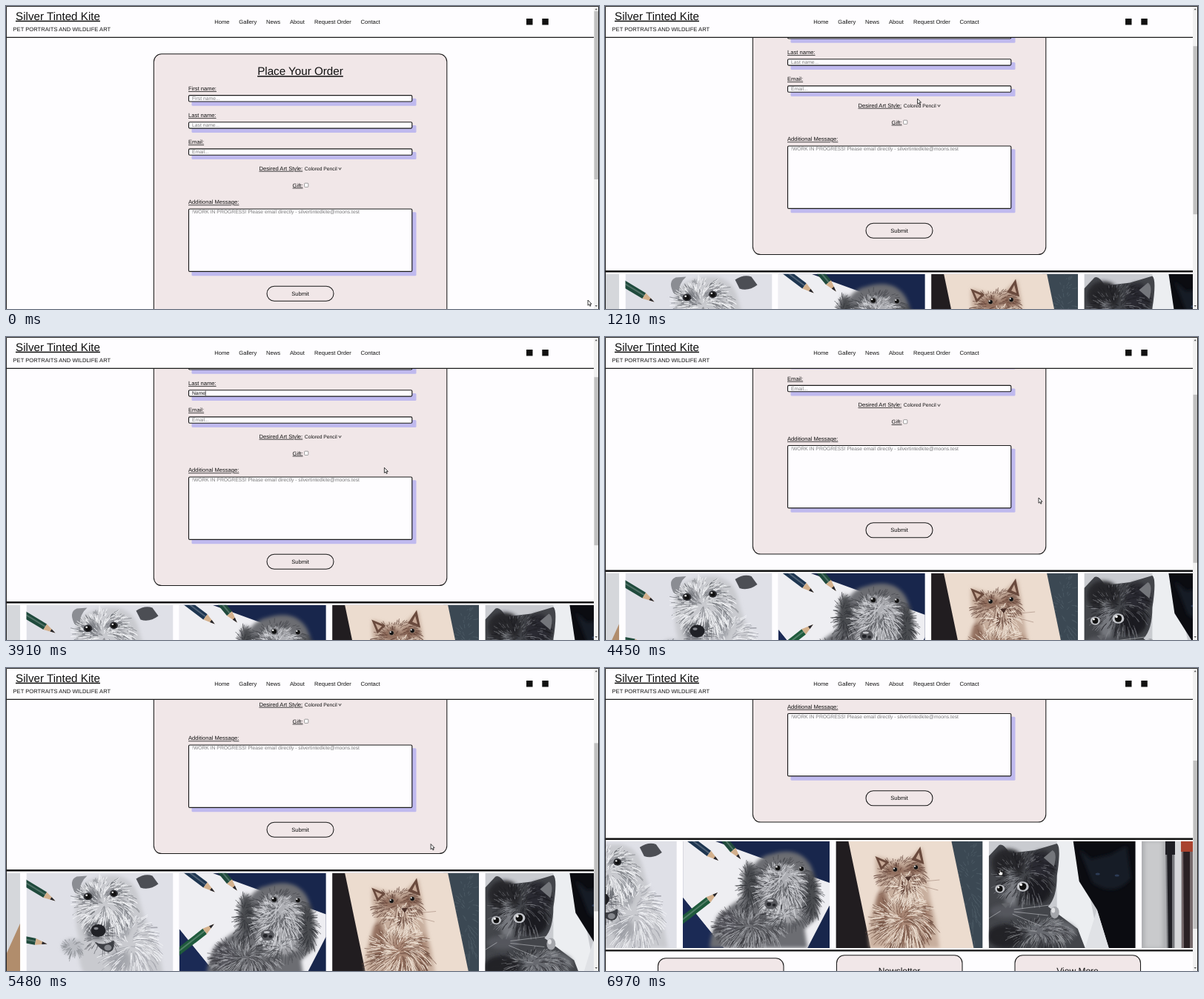
An HTML page that plays this animation: 800x409 px, repeating every 7.03 s.

```html
<!DOCTYPE html>
<html lang="en">
<head>
<meta charset="utf-8">
<title>Order form</title>
<style>
  html, body { margin: 0; width: 100%; height: 100%; overflow: hidden; background: #fefdff; }
  svg { display: block; }
  text { font: 7.6px "Liberation Sans", Arial, sans-serif; text-rendering: geometricPrecision; fill: #111; white-space: pre; }
  .u { text-decoration: underline; }
  .big { font-size: 15.2px; }
  .mid { font-size: 12px; }
  .small { font-size: 6.75px; }
  .hint { fill: #7a7a7a; }
  .c { text-anchor: middle; }
  .card { fill: #f1e7e8; stroke: #1a1a1a; stroke-width: 1.05; }
  .field { fill: #fefdff; stroke: #1a1a1a; stroke-width: 1.15; }
  .shade { fill: #bfb9ee; }
</style>
</head>
<body>
<svg id="stage" width="800" height="409" viewBox="0 0 800 409">
  <filter id="soft" x="-20%" y="-20%" width="140%" height="140%"><feGaussianBlur stdDeviation="2.5"/></filter>
  <rect width="800" height="409" fill="#fefdff"/>
  <g id="page">
    <rect class="card" x="199.4" y="64.8" width="395.4" height="355.8" rx="10.5"/>
    <text class="big u c" x="397" y="93.2">Place Your Order</text>
    <g id="fields"></g>
    <text class="u" x="341.5" y="221.8">Desired Art Style:</text>
    <text class="small" x="402.8" y="221.8">Colored Pencil</text>
    <path d="M448.8 218l1.7 3.2 1.7-3.2" fill="none" stroke="#222" stroke-width=".8"/>
    <text class="u" x="386.6" y="244.6">Gift:</text>
    <rect x="402.6" y="239.2" width="5.2" height="5.2" rx=".8" fill="#fff" stroke="#777" stroke-width=".7"/>
    <rect class="card" x="352" y="378.2" width="90" height="20" rx="10"/>
    <text class="c" x="397" y="390.8">Submit</text>
    <path d="M0 443.3H793M0 593.9H793" stroke="#111" stroke-width="2.4"/>
    <svg x="1" y="446.5" width="792" height="144"><g id="reel"></g></svg>
    <rect class="card" x="71.5" y="604.3" width="169.5" height="150" rx="10.5"/>
    <rect class="card" x="312.5" y="600.3" width="169.5" height="150" rx="10.5"/>
    <rect class="card" x="553" y="600.3" width="169.5" height="150" rx="10.5"/>
    <text class="mid c" x="397" y="625.8">Newsletter</text>
    <text class="mid c" x="637.5" y="625.8">View More</text>
  </g>
  <g id="header">
    <rect width="793" height="42" fill="#fefdff"/>
    <path d="M0 42.3H793" stroke="#1a1a1a" stroke-width="1.3"/>
    <text class="big u" x="13" y="18.7">Silver Tinted Kite</text>
    <text x="9.5" y="33.6">PET PORTRAITS AND WILDLIFE ART</text>
    <text x="281.3" y="23.8">Home</text>
    <text x="314.3" y="23.8">Gallery</text>
    <text x="351" y="23.8">News</text>
    <text x="383" y="23.8">About</text>
    <text x="416" y="23.8">Request Order</text>
    <text x="478.5" y="23.8">Contact</text>
    <path d="M702 17h8.5v8.5h-8.5zM723.3 17h8.5v8.5h-8.5z" fill="#111"/>
  </g>
  <rect x="793" width="7" height="409" fill="#f1f1f1"/>
  <path d="M794.5 5.2l1.7-2 1.7 2zM794.5 404l1.7 2 1.7-2z" fill="#555"/>
  <rect id="thumb" x="793.5" y="7" width="5.5" height="227" fill="#c1c1c1"/>
  <path d="M.5 409V.5H799.5V409" fill="none" stroke="#222"/>
  <g id="mouse" stroke="#111" stroke-width=".8" stroke-linejoin="round">
    <path id="arrow" d="M0 0V7.2L1.7 5.7 2.8 8.2 4 7.7 2.9 5.2H5z" fill="#fff"/>
    <path id="beam" d="M-1.5-3.5H1.5M0-3.5V3.5M-1.5 3.5H1.5" fill="none"/>
    <path id="hand" d="M-.8.6Q0-.6.8.6V3L3.6 3.6Q4.2 5.6 3 8H-.8L-2.8 5Q-2.6 4-.8 5z" fill="#fff"/>
  </g>
</svg>
<script>
const LOOP = 7030;
const $ = id => document.getElementById(id);

// ---- form fields ----
const field = (y, h, label, hint, id) => `
  <text class="u" x="246" y="${y - 6}">${label}</text>
  <rect class="shade" x="250.5" y="${y + 4.8}" width="303" height="${h + .6}" rx="1.5"/>
  <rect class="field" x="246.5" y="${y + .6}" width="301.3" height="${h - 1}" rx="1.5"/>
  <text class="small hint" id="${id}" x="251" y="${y + 7}">${hint}</text>`;

$('fields').innerHTML =
  field(120, 9.4, 'First name:', 'First name...', 'first') +
  field(156.1, 9.4, 'Last name:', 'Last name...', 'last') +
  field(192.3, 9.4, 'Email:', 'Email...', 'email') +
  field(273.4, 85.4, 'Additional Message:',
    '!WORK IN PROGRESS! Please email directly - silvertintedkite@moons.test', 'note') +
  '<path id="caret" d="M0 157.6v6.6" stroke="#111" stroke-width=".7"/>';

// ---- pictures ----
let seed = 7;
const rnd = () => (seed = seed * 16807 % 2147483647) / 2147483647;
const shape = (d, fill) => `<path d="${d}" fill="${fill}"/>`;
const oval = (x, y, rx, ry, fill) => `<ellipse cx="${x}" cy="${y}" rx="${rx}" ry="${ry}" fill="${fill}"/>`;
const soft = content => `<g filter="url(#soft)">${content}</g>`;
const back = fill => shape('M0 0H198V144H0z', fill);

// fine strokes that spread outwards from the middle of an oval
function fur(cx, cy, rx, ry, n, len, color, width = .6) {
  let d = '';
  for (let i = 0; i < n; i++) {
    const a = rnd() * 2 * Math.PI, r = Math.sqrt(rnd()), l = len * (.5 + rnd());
    const x = cx + Math.cos(a) * rx * r, y = cy + Math.sin(a) * ry * r;
    const dx = Math.cos(a + .3) * l, dy = Math.sin(a + .3) * l + l * .4;
    d += `M${x.toFixed(1)} ${y.toFixed(1)}q${(dx * .6).toFixed(1)} ${(dy * .3).toFixed(1)} ${dx.toFixed(1)} ${dy.toFixed(1)}`;
  }
  return `<path d="${d}" fill="none" stroke="${color}" stroke-width="${width}"/>`;
}

const pencil = (x, y, angle, color) =>
  `<g transform="translate(${x} ${y}) rotate(${angle})">` +
  shape('M-90-4.5H-16V4.5H-90z', color) + shape('M-90-1.5H-16V.5H-90z', '#ffffff38') +
  shape('M-16-4.5L0 0-16 4.5z', '#d3b08c') + shape('M-7-2L0 0-7 2z', '#25252b') + '</g>';

const eye = (x, y, r, iris) => oval(x, y, r, r * .85, iris) + oval(x, y, r * .6, r * .6, '#111') +
  oval(x - r * .3, y - r * .3, r * .22, r * .22, '#fff');

const board = () => back('#d5d7db') + shape('M198 68L170 130V144H198z', '#b18d6c');

const terrier = () => back('#dfe0e7') +
  pencil(39, 38, 31, '#1f4a3c') + pencil(28, 96, 11, '#1f4a3c') +
  soft(shape('M70 20Q90 2 122 4Q146 8 152 34Q158 62 178 100L186 144H82Q66 120 72 92Q62 60 70 20z', '#c9cacf') +
    oval(62, 100, 14, 11, '#babcc2') + oval(84, 33, 15, 12, '#85878d') + oval(119, 29, 13, 11, '#95979d') +
    oval(98, 78, 20, 14, '#84868c') + oval(132, 64, 9, 24, '#a2a4aa') + oval(126, 118, 15, 14, '#a7a9af')) +
  shape('M148 8Q160 0 170 4L178 15Q166 24 154 20z', '#4c4e54') +
  shape('M66 28Q56 10 68 5L82 4Q72 12 72 28z', '#8b8d93') +
  fur(140, 100, 34, 42, 180, 10, '#96989f') + fur(140, 100, 34, 44, 170, 10, '#f2f3f7', .9) +
  fur(105, 42, 38, 34, 200, 8, '#66686e') + fur(105, 44, 36, 36, 200, 9, '#f5f6f9', .9) +
  fur(100, 88, 20, 16, 70, 7, '#55575d') + fur(62, 100, 12, 10, 50, 6, '#83868c') +
  eye(83, 32, 6, '#2c2d32') + eye(118, 28, 5.5, '#2c2d32') +
  oval(97, 78, 10, 8.5, '#202126') + oval(94, 75, 3, 1.8, '#85878d') +
  shape('M92 93Q104 100 118 91Q120 107 110 107Q100 105 92 93z', '#3d3f45') + oval(110, 101, 5, 4, '#85878d');

const spaniel = () => back('#18264c') +
  shape('M0 0H44L198 56V86L168 144H55L0 76z', '#eeeef2') +
  shape('M0 76L55 144H0z', '#1b2a55') +
  soft(shape('M36 144Q38 100 78 78Q88 22 120 17Q156 6 172 32Q186 60 182 102L164 118L168 144z', '#6c6d72') +
    oval(132, 58, 27, 26, '#aeafb4') + oval(136, 98, 26, 13, '#a0a1a6') + oval(90, 56, 9, 27, '#4a4b50') +
    oval(174, 72, 8, 30, '#4a4b50') + oval(118, 84, 13, 11, '#85868b') + oval(60, 112, 16, 18, '#58595e')) +
  fur(88, 114, 44, 26, 260, 8, '#34353a') + fur(92, 116, 44, 24, 200, 8, '#b9babf') +
  fur(88, 60, 10, 32, 110, 7, '#2e2f34') + fur(174, 76, 8, 28, 90, 7, '#2e2f34') +
  fur(136, 48, 34, 26, 200, 8, '#3f4046') + fur(132, 64, 32, 32, 240, 8, '#dddee2', .7) +
  fur(138, 100, 28, 14, 110, 7, '#47484d') +
  eye(128, 36, 5.5, '#77787d') + eye(160, 37, 5, '#77787d') +
  oval(119, 84, 9, 7.5, '#56575c') + oval(116, 85, 3, 2.4, '#222328') + oval(123, 86, 2.4, 2, '#222328') +
  oval(118, 80, 4, 1.5, '#c4c5ca') +
  pencil(48, 26, 37, '#1d3550') + pencil(78, 24, 50, '#1f4a3c') + pencil(47, 69, -38, '#1f5a3c');

const inkCat = () => back('#211d20') + shape('M150 0H198V144H180z', '#3b4853') +
  fur(182, 70, 14, 70, 90, 7, '#54636e') +
  shape('M17 0H156L186 144H47z', '#ecdccf') +
  soft(shape('M54 20L76 26L98 24L116 8L121 34Q124 66 134 104L140 144H46Q40 104 60 66Q52 44 54 20z', '#c8af9e') +
    oval(80, 40, 14, 9, '#93705f') + oval(106, 37, 12, 9, '#93705f') + oval(62, 94, 9, 28, '#93705f') +
    oval(92, 112, 13, 28, '#a98775') + oval(122, 110, 7, 28, '#a98775')) +
  fur(90, 110, 38, 34, 330, 10, '#6a4a3d') + fur(92, 106, 36, 36, 200, 9, '#eee0d3', .9) +
  fur(88, 44, 30, 22, 210, 7, '#5a3a30') + fur(96, 62, 20, 18, 90, 8, '#eee0d3', .9) +
  shape('M53 20L72 28 61 39zM114 7L119 31 102 25z', '#6a4a3d') + shape('M58 25L67 29 62 34zM112 15L115 26 108 23z', '#c6a896') +
  eye(80, 38, 4.5, '#8d7263') + eye(108, 35, 4.5, '#8d7263') +
  shape('M93 48L102 47 98 54z', '#4a3029') +
  '<path d="M97 54V60M84 57L56 60M86 61L58 72M108 55L140 52M108 58L138 66" stroke="#7a5a4c" stroke-width=".4"/>';

const blackCat = () => back('#c9cbd0') + shape('M92 0H122L150 144H92z', '#eceef1') +
  shape('M114 0H198V144H162L146 92L122 54z', '#0b0c11') + shape('M146 92L162 144H130z', '#e0e2e6') +
  soft(shape('M122 10L138 24L164 18L186 6L192 50Q170 76 140 56z', '#191c26')) +
  oval(147, 44, 3, 1.6, '#2c3b55') + oval(173, 46, 3, 1.6, '#2c3b55') +
  shape('M0 20L14 5Q20 2 28 16L62 12L92 3Q98 8 92 46Q92 76 80 88L120 118L130 144H0z', '#43454a') +
  soft(oval(26, 30, 22, 20, '#26272b') + oval(72, 34, 18, 22, '#2b2c31') + oval(66, 66, 18, 18, '#1e1f23') +
    oval(30, 66, 9, 28, '#75777d') + oval(24, 94, 22, 9, '#55575d') + oval(84, 122, 34, 16, '#686a70') +
    oval(22, 128, 24, 16, '#222327')) +
  fur(50, 44, 38, 30, 240, 7, '#1b1c20') + fur(46, 50, 36, 34, 130, 7, '#8d8f95', .5) +
  fur(70, 122, 42, 18, 170, 8, '#a2a4a9', .5) + fur(62, 124, 46, 18, 150, 8, '#25262a') +
  shape('M86 12Q93 16 88 34L74 22z', '#74767b') +
  eye(15, 64, 6.5, '#c3c5ca') + eye(46, 61, 8, '#c3c5ca') +
  shape('M17 84L28 83 23 90z', '#63656a') +
  '<path d="M34 92L82 86M34 95L80 100M32 98L70 114M16 94L0 104" stroke="#d9dade" stroke-width=".5"/>' +
  oval(89, 96, 6, 8, '#a4a6ab') + oval(87, 93, 2.5, 3.5, '#dfe0e3');

const pens = () => back('#aeafb2') + soft(shape('M4 0H28V144H4z', '#c9cacc')) +
  shape('M32 0H44V144H34z', '#77787c') + shape('M34 0H41V144H36z', '#1f1f24') + shape('M32 0H45V18H32z', '#1f1f24') +
  shape('M45 0H53V144H45z', '#d8d9db') +
  shape('M54 0H69V144H54z', '#75696b') + shape('M56 0H65V144H57z', '#2a2124') + shape('M53 0H70V14H53z', '#a9432f');

$('reel').innerHTML = [board, terrier, spaniel, inkCat, blackCat, pens, board].map((draw, i) =>
  `<svg x="${(i - 1) * 206.3 + 26.5}" width="198" height="144">${draw()}</svg>`).join('');

// ---- motion ----
const clamp = v => Math.max(0, Math.min(1, v));
const smooth = v => v * v * (3 - 2 * v);
const WHEEL = [470, 860, 4020, 4700, 5480];
const TYPED = [2300, 2500, 2690, 2880];
const PATH = [[120, 785, 397], [950, 421.5, 125], [1300, 421.5, 125], [1750, 338, 76], [2300, 334, 80],
  [3400, 334, 80], [4200, 585, 217], [4800, 585, 217], [5100, 579, 230], [5300, 579, 230],
  [5950, 548, 270], [6350, 548, 270], [6800, 533, 272]];

function mouseAt(t) {
  const i = PATH.findIndex(p => p[0] > t);
  if (i < 0) return PATH[PATH.length - 1].slice(1);
  if (i === 0) return PATH[0].slice(1);
  const [t0, x0, y0] = PATH[i - 1], [t1, x1, y1] = PATH[i];
  const k = smooth((t - t0) / (t1 - t0));
  return [x0 + (x1 - x0) * k, y0 + (y1 - y0) * k];
}

const show = (id, on) => $(id).setAttribute('visibility', on ? 'visible' : 'hidden');
const move = (id, x, y) => $(id).setAttribute('transform', `translate(${x} ${y})`);

function draw() {
  const t = performance.now() % LOOP;

  const steps = WHEEL.reduce((sum, w) => sum + smooth(clamp((t - w) / 180)), 0);
  move('page', 0, -42.5 * steps);
  move('thumb', 0, 23.6 * steps);

  const slide = 1 - (1 - clamp((t - 6590) / 1370)) ** 3;
  move('reel', -206.3 * slide, 0);

  const count = TYPED.filter(k => t >= k).length;
  $('last').textContent = count ? 'Name'.slice(0, count) : 'Last name...';
  $('last').setAttribute('class', count ? 'small' : 'small hint');
  const sinceKey = t - (count ? TYPED[count - 1] : 1780);
  show('caret', t > 1780 && t < 4000 && sinceKey % 1000 < 500);
  move('caret', 251.2 + [0, 4.9, 8.6, 14.3, 18][count], 0);

  const [x, y] = mouseAt(t);
  const beam = t > 1680 && t < 3520, hand = t > 5850;
  move('mouse', x, y);
  show('beam', beam);
  show('hand', hand);
  show('arrow', !beam && !hand);

  requestAnimationFrame(draw);
}
draw();
</script>
</body>
</html>
```
